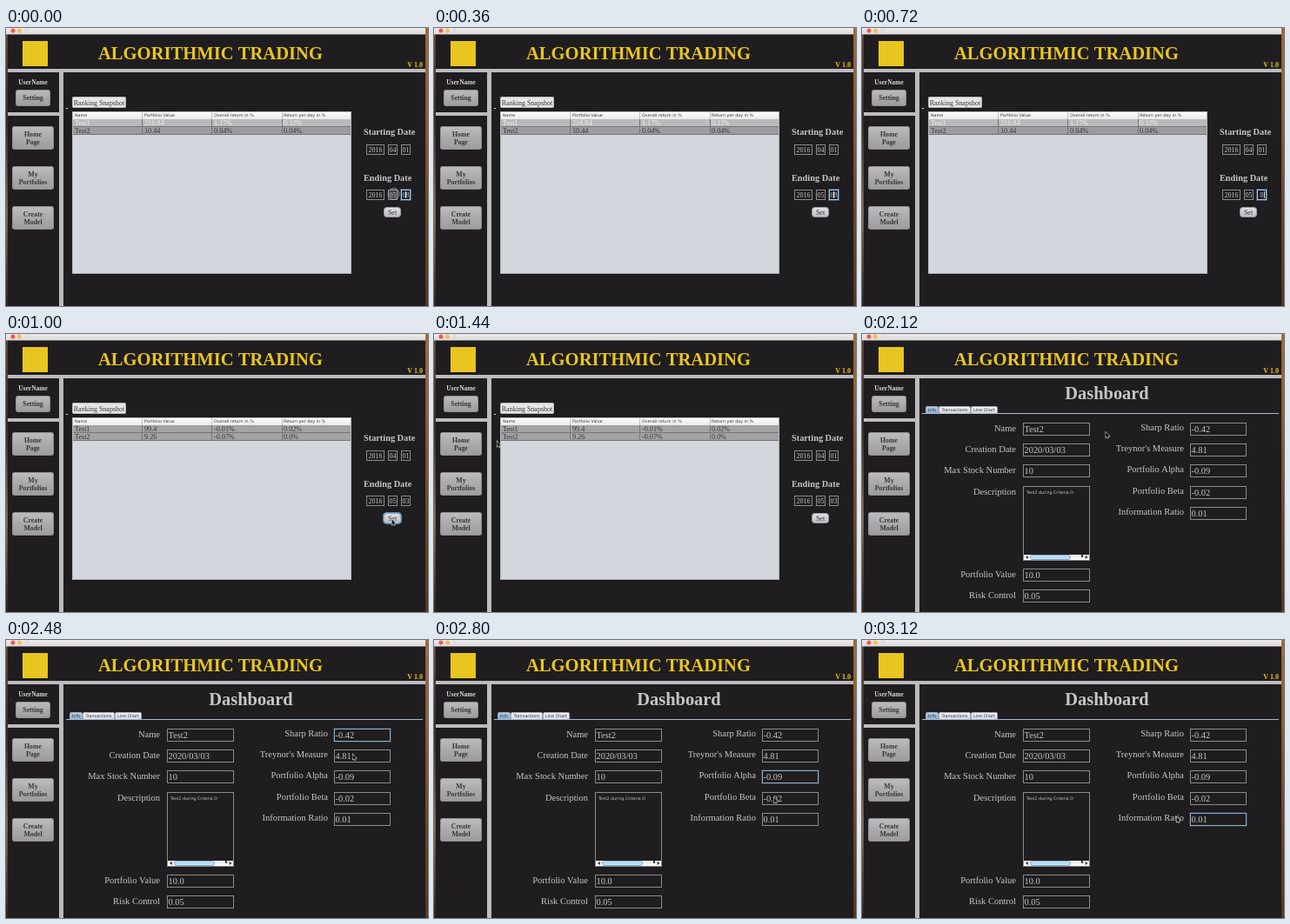
These frames come from a looping animation (485x320 px, 3160 ms). An HTML page with a canvas:

```html
<!DOCTYPE html>
<html lang="en">
<head>
<meta charset="utf-8">
<title>Algorithmic Trading</title>
<style>
html, body { margin: 0; width: 485px; height: 320px; overflow: hidden; background: #1f1d20; }
canvas { display: block; }
</style>
</head>
<body>
<canvas id="stage" width="485" height="320"></canvas>
<script>
const ctx = document.getElementById('stage').getContext('2d');
const LOOP = 3160, UPDATED = 960, DASHBOARD = 1600;
const SERIF = '"Liberation Serif", Times, serif';
const SANS = '"DejaVu Sans", sans-serif';
const DARK = '#1f1d20', BAR = '#bcbbbe', YELLOW = '#e9c61c', PALE = '#c6c5c8';
const EDGE = '#8b8a8d', INK = '#38363a';

function rect(x, y, w, h, fill) {
  ctx.fillStyle = fill;
  ctx.fillRect(x, y, w, h);
}

function frame(x, y, w, h, color) {
  ctx.strokeStyle = color;
  ctx.lineWidth = 1;
  ctx.strokeRect(x + .5, y + .5, w - 1, h - 1);
}

function text(str, x, y, size, color, align = 'left', weight = 'normal', family = SERIF) {
  ctx.font = `${weight} ${size}px ${family}`;
  ctx.fillStyle = color;
  ctx.textAlign = align;
  ctx.fillText(str, x, y);
}

function shade(y, h, ...colors) {
  const g = ctx.createLinearGradient(0, y, 0, y + h);
  colors.forEach((c, i) => g.addColorStop(i / (colors.length - 1), c));
  return g;
}

function pill(x, y, w, h, r, fill, edge) {
  ctx.beginPath();
  ctx.roundRect(x + .5, y + .5, w - 1, h - 1, r);
  ctx.fillStyle = fill;
  ctx.fill();
  ctx.strokeStyle = edge;
  ctx.lineWidth = 1;
  ctx.stroke();
}

function dot(x, y, r, fill) {
  ctx.beginPath();
  ctx.arc(x, y, r, 0, 7);
  ctx.fillStyle = fill;
  ctx.fill();
}

function button(x, y, w, h, ...lines) {
  pill(x, y, w, h, 2, shade(y, h, '#bdbcbe', '#aaa9ab', '#9c9b9d'), '#8f8e91');
  const first = y + h / 2 + 2.5 - (lines.length - 1) * 4.5;
  lines.forEach((s, i) => text(s, x + w / 2, first + i * 9, 7.8, INK, 'center', 'bold'));
}

function drawShell() {
  rect(0, 0, 485, 320, DARK);
  rect(0, 0, 2, 320, shade(0, 320, '#6b4632', '#3a2a24', '#87684e', '#30231e'));
  rect(482, 0, 3, 320, shade(0, 320, '#a06a35', '#8b5a2e', '#6d4626', '#54381f'));
  rect(0, 0, 482, 7.4, shade(0, 7, '#efebeb', '#dcdadb'));
  dot(8, 3, 2.5, '#f2574c');
  dot(15.5, 3, 2.5, '#f3bd55');
  dot(24, 3, 2.5, '#dedcdc');

  rect(19, 15, 29, 29, '#e8c520');
  text('ALGORITHMIC TRADING', 235, 36, 20.6, YELLOW, 'center', 'bold');
  text('V 1.0', 479, 45, 8, YELLOW, 'right', 'bold');
  rect(2, 47, 480, 4, BAR);
  rect(61, 51, 5, 269, BAR);
  rect(2, 97, 59, 4, BAR);

  text('UserName', 31, 65, 7.5, '#d6d5d8', 'center', 'bold');
  button(11, 71, 40, 19, 'Setting');
  button(7, 113, 48, 27, 'Home', 'Page');
  button(7, 159, 48, 27, 'My', 'Portfolios');
  button(7, 205, 48, 27, 'Create', 'Model');
}

const COLS = [79, 159, 239, 319];

function tableRow(y, cells, fill, color) {
  rect(76, y, 321, 9, fill);
  cells.forEach((s, i) => text(s, COLS[i], y + 7.2, 8.2, color));
  rect(76, y + 8, 321, 1, '#77767a');
}

function drawTable(updated) {
  pill(76, 79, 62, 13, 1, '#e6e6e8', '#b5b5b8');
  text('Ranking Snapshot', 107, 88.5, 8, INK, 'center');
  rect(69, 92, 2, 1, '#dddddf');

  rect(76, 96, 321, 187, '#d3d6dd');
  rect(76, 96, 321, 9, shade(96, 9, '#ffffff', '#e9e9eb'));
  ['Name', 'Portfolio Value', 'Overall return in %', 'Return per day in %']
    .forEach((s, i) => text(s, COLS[i], 102.4, 4.85, INK, 'left', 'normal', SANS));
  if (updated) {
    tableRow(105, ['Test1', '99.4', '-0.01%', '0.02%'], '#a3a2a5', INK);
    tableRow(114, ['Test2', '9.26', '-0.07%', '0.0%'], '#a3a2a5', INK);
  } else {
    tableRow(105, ['Test1', '216.84', '1.17%', '0.12%'], '#bab9bc', '#f0f0f1');
    tableRow(114, ['Test2', '10.44', '0.04%', '0.04%'], '#9d9c9f', INK);
  }
  [156, 236, 317].forEach(x => {
    rect(x, 97, 1, 8, '#c2c2c5');
    rect(x, 105, 1, 18, '#77767a');
  });
  frame(76, 96, 321, 187, '#b3b5ba');
}

function dateFields(y, parts, focus) {
  [[414, 21], [439, 11], [454, 11]].forEach(([x, w], i) => {
    const on = focus && i === 2;
    if (on) frame(x - 1, y - 1, w + 2, 14, '#3f5a72');
    frame(x, y, w, 12, on ? '#a9cbe8' : EDGE);
    text(parts[i], x + w / 2, y + 9, 8, PALE, 'center');
  });
}

function drawRanking(t) {
  const updated = t >= UPDATED;
  drawTable(updated);
  text('Starting Date', 411, 123, 10.3, PALE, 'left', 'bold');
  dateFields(134, ['2016', '04', '01']);
  text('Ending Date', 411, 176, 10.3, PALE, 'left', 'bold');
  const day = t < 480 ? '08' : t < 800 ? '0' : '03';
  dateFields(186, ['2016', '05', day], !updated);
  if (!updated) rect(day === '0' ? 462 : 459, 188, 1, 8, '#d6d6d8');

  const pressed = updated && t < 1160;
  if (pressed) pill(433, 205, 22, 14, 4, '#7ea6ca', '#5f8bb4');
  pill(434, 206, 20, 12, 3, shade(206, 12, '#e2e1e4', '#bdbcc0'), pressed ? '#83a8ca' : '#98979a');
  text('Set', 444, 214.7, 8, INK, 'center');
}

const LEFT = [
  ['Name', 'Test2', 102], ['Creation Date', '2020/03/03', 126],
  ['Max Stock Number', '10', 150], ['Portfolio Value', '10.0', 270],
  ['Risk Control', '0.05', 294]
];
const RIGHT = [
  ['Sharp Ratio', '-0.42', 102], ["Treynor's Measure", '4.81', 126],
  ['Portfolio Alpha', '-0.09', 150], ['Portfolio Beta', '-0.02', 175],
  ['Information Ratio', '0.01', 199]
];

function field([label, value, y], labelX, labelY, x, w, focus) {
  text(label, labelX, labelY, 10.5, PALE, 'right');
  if (focus) frame(x - 1, y - 1, w + 2, 17, '#2d3a46');
  frame(x, y, w, 15, focus ? '#93adc2' : EDGE);
  text(value, x + 1.5, y + 10.9, 10.4, PALE);
}

function triangle(x, y, dir) {
  ctx.beginPath();
  ctx.moveTo(x + dir * 1.6, y);
  ctx.lineTo(x - dir * 1.4, y - 2);
  ctx.lineTo(x - dir * 1.4, y + 2);
  ctx.fillStyle = '#3b3a3e';
  ctx.fill();
}

function drawDescription() {
  text('Description', 177, 185.3, 10.5, PALE, 'right');
  frame(185, 175, 77, 86, EDGE);
  text('Test2 during Criteria D', 189, 184, 4.8, PALE, 'left', 'normal', SANS);
  rect(186, 254, 75, 6, shade(254, 6, '#e2e2e5', '#ffffff'));
  pill(193, 254, 47, 6, 3, shade(254, 6, '#e3f1fb', '#b3d5f0', '#e0f4fd'), '#7ea9cf');
  triangle(189.5, 257, -1);
  triangle(258, 257, 1);
  rect(252, 254, 2, 3, '#3b3a3e');
}

function tab(label, x, w, active) {
  const fill = active ? shade(83, 8, '#b4d0ea', '#84add3') : shade(83, 8, '#f4f4f6', '#dadadd');
  pill(x, 83, w, 9, 1.5, fill, '#a3a9b1');
  text(label, x + w / 2, 89.2, 4.85, INK, 'center', 'normal', SANS);
}

function focusedField(t) {
  return [2320, 2540, 2680, 2820, 2960].filter(s => t >= s).length - 1;
}

function drawDashboard(t) {
  text('Dashboard', 281.5, 75, 20.4, PALE, 'center', 'bold');
  tab('Info', 73, 15, true);
  tab('Transactions', 88, 37);
  tab('Line Chart', 125, 31);
  rect(69, 91, 410, 1, '#a3bbd3');
  LEFT.forEach(row => field(row, 177, row[2] + 10.3, 185, 77));
  drawDescription();
  const focus = focusedField(t);
  RIGHT.forEach((row, i) => field(row, 370, row[2] + 9.3, 377, 65, i === focus));
}

// Pointer stops: time, x, y
const PATH = [
  [880, 448, 204], [960, 443, 213], [1080, 443, 213], [1440, 72, 123],
  [1600, 84, 119], [1720, 87, 120], [1920, 110, 119], [2280, 399, 108],
  [2360, 400, 109], [2480, 398, 131], [2560, 396, 134], [2680, 393, 157],
  [2820, 390, 182], [2960, 384, 204], [3120, 361, 203]
];

function pointerAt(t) {
  const i = PATH.findIndex(p => p[0] > t);
  if (i < 0) return PATH[PATH.length - 1].slice(1);
  const [t0, x0, y0] = PATH[i - 1], [t1, x1, y1] = PATH[i];
  const k = (t - t0) / (t1 - t0), e = k * k * (3 - 2 * k);
  return [x0 + (x1 - x0) * e, y0 + (y1 - y0) * e];
}

function drawPointer(t) {
  if (t < 240) {
    ctx.beginPath();
    ctx.arc(445.5, 191, 6.5, 0, 7);
    ctx.fillStyle = 'rgba(190,190,194,.22)';
    ctx.fill();
    ctx.strokeStyle = 'rgba(190,190,194,.65)';
    ctx.lineWidth = 1;
    ctx.stroke();
    return;
  }
  if (t < PATH[0][0]) return;
  const [x, y] = pointerAt(t);
  ctx.save();
  ctx.translate(x + .5, y + .5);
  ctx.scale(.85, .85);
  ctx.beginPath();
  [[0, 0], [0, 7], [1.6, 5.6], [2.7, 8], [3.9, 7.4], [2.9, 5.2], [5, 5]]
    .forEach(p => ctx.lineTo(...p));
  ctx.closePath();
  ctx.strokeStyle = '#dcdcde';
  ctx.lineWidth = 1.3;
  ctx.stroke();
  ctx.fillStyle = '#080808';
  ctx.fill();
  ctx.restore();
}

const start = performance.now();

function render(now) {
  const t = Math.max(0, now - start) % LOOP;
  drawShell();
  if (t < DASHBOARD) drawRanking(t);
  else drawDashboard(t);
  drawPointer(t);
  requestAnimationFrame(render);
}

render(start);
</script>
</body>
</html>
```
